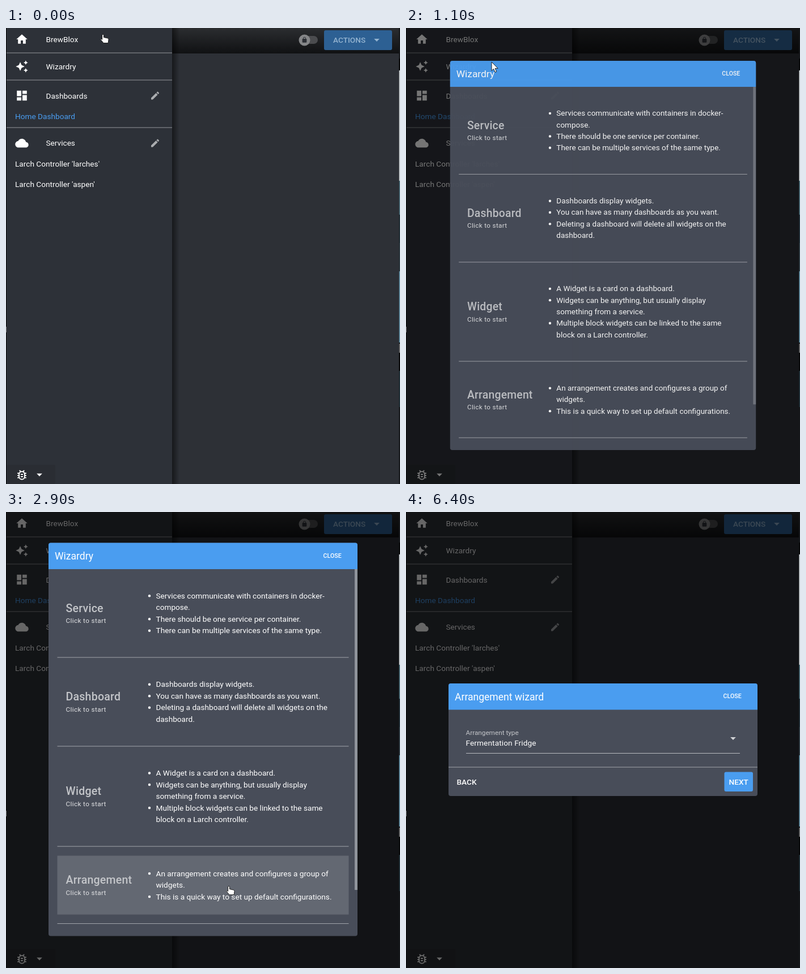
Animation of 695 by 806 pixels, one loop 6.6 s. Source, as an HTML page:

```html
<!DOCTYPE html>
<html lang="en">
<head>
<meta charset="utf-8">
<title>Wizardry</title>
<style>
  html, body { margin: 0; width: 100%; height: 100%; overflow: hidden; background: #2d3036; }
  svg { display: block; width: 695px; height: 806px; font: 13.65px Roboto, sans-serif; fill: #fff; }
  path { fill-rule: evenodd; }
  .strong { font-weight: 500; }
  .title { font-size: 17.55px; }
  .close { font-size: 10.7px; font-weight: 500; }
  .heading { font-size: 19.5px; font-weight: 500; letter-spacing: .0125em; fill: #c3c5c9; }
  .caption { font-size: 11.7px; letter-spacing: .0333em; fill: #e3e4e6; }
  .link { fill: #4a9df0; }
</style>
</head>
<body>
<svg id="stage" viewBox="0 0 695 806"></svg>
<script>
const BLUE = '#4a9df0', PANEL = '#484d59', LOOP = 6600;

const icons = {
  home: 'M10 20v-6h4v6h5v-8h3L12 3 2 12h3v8z',
  sparkles: 'M19 1l-1.26 2.75L15 5l2.74 1.26L19 9l1.25-2.74L23 5l-2.75-1.25zM9 4L6.5 9.5 1 12l5.5 2.5L9 20l2.5-5.5L17 12l-5.5-2.5zM19 15l-1.26 2.74L15 19l2.74 1.25L19 23l1.25-2.75L23 19l-2.75-1.26z',
  board: 'M3 13h8V3H3zM3 21h8v-6H3zM13 21h8V11h-8zM13 3v6h8V3z',
  cloud: 'M19.35 10.04C18.67 6.59 15.64 4 12 4 9.11 4 6.6 5.64 5.35 8.04 2.34 8.36 0 10.91 0 14c0 3.31 2.69 6 6 6h13c2.76 0 5-2.24 5-5 0-2.64-2.05-4.78-4.65-4.96z',
  pencil: 'M3 17.25V21h3.75L17.81 9.94l-3.75-3.75zM20.71 7.04c.39-.39.39-1.02 0-1.41l-2.34-2.34c-.39-.39-1.02-.39-1.41 0l-1.83 1.83 3.75 3.75z',
  lock: 'M18 8h-1V6a5 5 0 0 0-10 0v2H6a2 2 0 0 0-2 2v10a2 2 0 0 0 2 2h12a2 2 0 0 0 2-2V10a2 2 0 0 0-2-2zM9 6a3 3 0 0 1 6 0v2H9z',
  bug: 'M20 8h-2.81c-.45-.8-1.07-1.5-1.82-2L17 4.41 15.59 3l-2.17 2.17a6 6 0 0 0-2.83 0L8.41 3 7 4.41 8.62 6c-.75.5-1.36 1.21-1.81 2H4v2h2.09c-.06.33-.09.66-.09 1v1H4v2h2v1c0 .34.03.67.09 1H4v2h2.81a6 6 0 0 0 10.38 0H20v-2h-2.09c.06-.33.09-.66.09-1v-1h2v-2h-2v-1c0-.34-.03-.67-.09-1H20zM16 15a4 4 0 0 1-8 0v-4a4 4 0 0 1 8 0zM14 10v2h-4v-2zM10 14h4v2h-4z',
  caret: 'M7 9.5l5 5 5-5z'
};

const rect = (x, y, w, h, fill, more = '') =>
  `<rect x="${x}" y="${y}" width="${w}" height="${h}" fill="${fill}" ${more}/>`;
const text = (x, y, label, cls = '', more = '') =>
  `<text x="${x}" y="${y}" class="${cls}" ${more}>${label}</text>`;
const icon = (name, cx, cy, fill = '#fff', scale = .975) =>
  `<path d="${icons[name]}" fill="${fill}" transform="translate(${cx} ${cy}) scale(${scale}) translate(-12 -12)"/>`;
const gradient = (id, vertical, from, to) =>
  `<linearGradient id="${id}" x2="${vertical ? 0 : 1}" y2="${vertical ? 1 : 0}">
    <stop stop-color="${from}"/><stop offset="1" stop-color="${to}"/></linearGradient>`;

const page = () => {
  const divider = y => rect(1, y, 292, 1, '#96989c');
  return rect(0, 0, 695, 806, '#2d3036') +
    rect(293, 0, 400, 45, 'url(#bar)') +
    rect(521, 14, 29, 14, '#4b4c4f', 'rx="7"') +
    '<circle cx="526.5" cy="21.5" r="10" fill="#858688"/>' + icon('lock', 526.5, 21, '#2d3036', .48) +
    rect(561, 4, 120, 35, '#2d6093', 'rx="3"') +
    text(577, 26, 'ACTIONS', 'strong', 'style="fill:#93b3d0"') + icon('caret', 654, 21.5, '#93b3d0') +
    rect(1, 0, 292, 806, '#2d3138') + rect(293, 0, 13, 806, 'url(#shade)') +
    rect(1, 0, 292, 44, '#fff', 'id="homeHover"') +
    divider(43.5) + divider(91.5) + divider(175.5) +
    icon('home', 28, 20) + text(70.5, 25, 'BrewBlox') +
    icon('sparkles', 28, 68) + text(70.5, 73, 'Wizardry') +
    icon('board', 28, 119.5) + text(70.5, 124.5, 'Dashboards') + icon('pencil', 263, 119.5, '#abadb0', .78) +
    text(16, 161, 'Home Dashboard', 'link') +
    icon('cloud', 28, 203.5) + text(70.5, 208, 'Services') + icon('pencil', 263, 203.5, '#abadb0', .78) +
    text(16, 245, "Larch Controller 'larches'") + text(16, 281, "Larch Controller 'aspen'") +
    rect(1, 772, 86, 34, '#2a2d33', 'rx="3"') + icon('bug', 28, 790) + icon('caret', 59, 790);
};

const dialogFrame = (top, bottom, title) =>
  rect(75, top, 545, bottom - top, PANEL, 'rx="4"') +
  `<path d="M75 ${top + 46.5}v-42.5q0-4 4-4h537q4 0 4 4v42.5z" fill="${BLUE}"/>` +
  text(86, top + 29.5, title, 'title') + text(559.5, top + 26, 'CLOSE', 'close');

// Lines that start with an asterisk get a bullet.
const choices = [
  { name: 'Service', top: 117, bottom: 241, lines: [
    '*Services communicate with containers in docker-', 'compose.',
    '*There should be one service per container.',
    '*There can be multiple services of the same type.'] },
  { name: 'Dashboard', top: 273, bottom: 398, lines: [
    '*Dashboards display widgets.',
    '*You can have as many dashboards as you want.',
    '*Deleting a dashboard will delete all widgets on the', 'dashboard.'] },
  { name: 'Widget', top: 430, bottom: 575, lines: [
    '*A Widget is a card on a dashboard.',
    '*Widgets can be anything, but usually display', 'something from a service.',
    '*Multiple block widgets can be linked to the same', 'block on a Larch controller.'] },
  { name: 'Arrangement', top: 607.5, bottom: 711.5, lines: [
    '*An arrangement creates and configures a group of', 'widgets.',
    '*This is a quick way to set up default configurations.'] }
];

const choiceRow = ({ name, top, bottom, lines }) => {
  const middle = (top + bottom) / 2;
  const firstLine = middle - (lines.length - 1) * 10.25;
  return rect(90.5, top, 514, bottom - top, '#fff', 'class="hover"') +
    text(105.5, middle - 2.3, name, 'heading') + text(105.5, middle + 17.3, 'Click to start', 'caption') +
    lines.map((line, i) => {
      const y = firstLine + i * 20.5;
      const bullet = line[0] === '*' ? `<circle cx="253" cy="${y}" r="2.2"/>` : '';
      return bullet + text(264.5, y + 4.5, line.replace('*', ''));
    }).join('') +
    rect(90.5, bottom + 15.5, 514, 1, '#a2a5ab');
};

const menuDialog = () => dialogFrame(54.5, 749.5, 'Wizardry') +
  choices.map(choiceRow).join('') + rect(615, 101, 5, 567, '#8f939b', 'id="scrollThumb"');

const wizardDialog = () => dialogFrame(303, 502, 'Arrangement wizard') +
  text(105.5, 405, 'Arrangement type', '', 'id="fieldLabel" style="fill:#c3c5c9"') +
  text(105.5, 412.5, 'Fermentation Fridge', '', 'letter-spacing=".1"') +
  icon('caret', 577, 400.5, '#d2d4d7') + rect(106, 426, 483, 1, '#b9bbc0') +
  rect(75, 450.5, 545, 1, '#a2a5ab') + text(89.5, 482, 'BACK', 'strong') +
  rect(561.5, 459.5, 50.5, 34.5, BLUE, 'rx="3"') + text(569.5, 482, 'NEXT', 'strong');

// Slivers of the desktop visible beside the app.
const edges = () => rect(0, 0, 1, 806, '#08090a') + rect(0, 528, 1, 10, '#777') +
  rect(693, 0, 2, 806, '#15171a') +
  [[54, 20, '#000'], [75, 195, '#dfe5e8'], [270, 60, '#547884'], [330, 50, '#26363f'],
   [380, 50, '#34424a'], [430, 126, '#6f9fb5'], [558, 16, '#777'], [574, 32, '#000'],
   [606, 64, '#22343c']].map(([y, h, fill]) => rect(693.5, y, 1.5, h, fill)).join('');

const pointer = 'stroke="#111" stroke-width=".9" stroke-linejoin="round"';
stage.innerHTML = `<defs>${gradient('bar', true, '#2b2d30', '#101113')}
    ${gradient('shade', false, 'rgba(0,0,0,.5)', 'rgba(0,0,0,0)')}</defs>` +
  page() + rect(1, 0, 692, 806, '#000', 'id="backdrop"') + edges() +
  `<g id="menu">${menuDialog()}</g><g id="wizard">${wizardDialog()}</g>
  <g id="cursor" ${pointer}>
    <path id="arrow" d="M0 0v15.5l3.5-3.2 2.7 6 2.5-1.1-2.6-5.8h5z"/>
    <path id="hand" d="M-1.4 0q1.4-1.5 2.8 0v4.5l7 1.6q1.9.5 1.6 2.5l-.9 6H1L-4 8.5q.3-1.9 2.6-.2z"/>
  </g>`;

const path = [
  [0, 171, 12], [100, 168, 21], [200, 162, 40], [300, 154, 55], [400, 151, 60],
  [1600, 151, 60], [1700, 158, 75], [1800, 185, 130], [2100, 270, 320], [2300, 317, 431],
  [2400, 355, 532], [2600, 355, 532], [2700, 365, 565], [2800, 386, 640], [2900, 393, 662],
  [4300, 393, 662], [4400, 313, 562], [4800, 313, 562], [4900, 167, 147], [5500, 104, 29],
  [5600, 99, 15], [5700, 93, 1], [5800, 93, -30], [LOOP, 93, -30]
];
const hoverTimes = [[1800, 2000], [2050, 2250], [2300, 2650], [2650, LOOP]];

const clamp = v => Math.min(1, Math.max(0, v));
const easeOut = (p, power) => 1 - (1 - p) ** power;
const hoverLevel = (t, [start, end]) => .15 * (clamp((t - start) / 250) - clamp((t - end) / 250));
const show = (el, visible) => el.style.display = visible ? '' : 'none';
const rows = document.querySelectorAll('.hover');

function cursorAt(t) {
  const next = Math.max(1, path.findIndex(key => key[0] >= t));
  const [t0, x0, y0] = path[next - 1], [t1, x1, y1] = path[next];
  const p = (t - t0) / (t1 - t0);
  return [x0 + (x1 - x0) * p, y0 + (y1 - y0) * p];
}

function render(time) {
  const t = Math.floor(time % LOOP / 100) * 100;
  const opening = clamp((t - 865) / 300);
  const scale = easeOut(opening, 3);
  const opacity = easeOut(opening, 2);
  const inWizard = t >= 3700;

  backdrop.style.opacity = .6 * easeOut(opening, 1.5);
  show(menu, opening > 0 && !inWizard);
  menu.style.opacity = opacity;
  menu.setAttribute('transform', `translate(347.5 402) scale(${scale}) translate(-347.5 -402)`);
  scrollThumb.style.opacity = clamp((t - 950) / 250);
  homeHover.style.opacity = hoverLevel(t, [50, 150]);
  rows.forEach((row, i) => row.style.opacity = hoverLevel(t, hoverTimes[i]));

  show(wizard, inWizard);
  const floating = t >= 4000;
  fieldLabel.style.fontSize = floating ? '11.75px' : '15.6px';
  fieldLabel.setAttribute('y', floating ? 393.5 : 405);

  const pointing = t < 900 || (t >= 1800 && !inWizard);
  show(hand, pointing);
  show(arrow, !pointing);
  cursor.setAttribute('transform', `translate(${cursorAt(t)})`);
}

function tick() {
  render(performance.now());
  requestAnimationFrame(tick);
}
tick();
</script>
</body>
</html>
```
